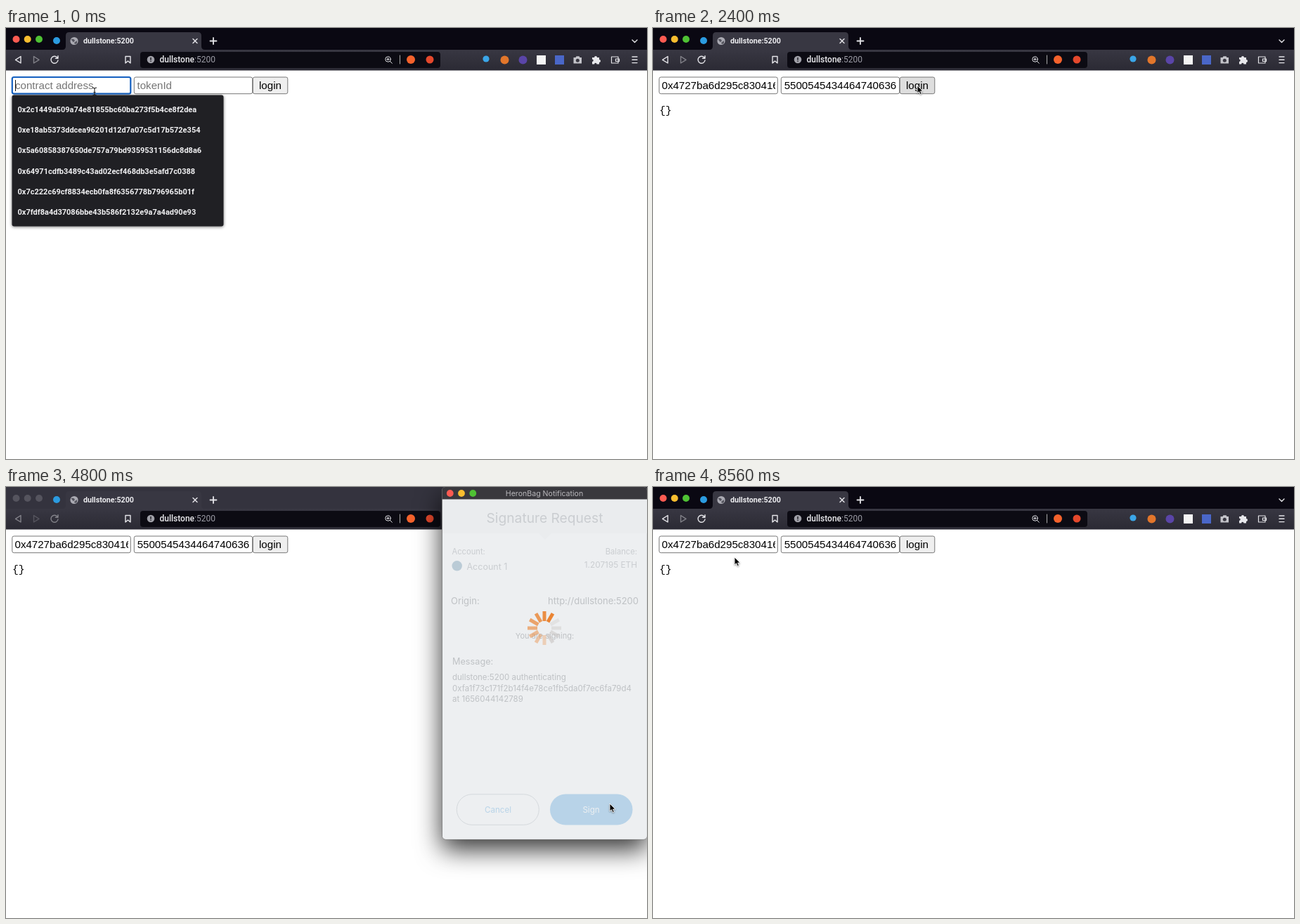
Recreate the animation shown at these times as an HTML page. Size 912 by 614 pixels, loop 8640 ms.

```html
<!DOCTYPE html>
<html lang="en">
<head>
<meta charset="utf-8">
<title>Token login</title>
<style>
html, body { margin: 0; width: 100%; height: 100%; overflow: hidden; background: #fff; }
svg { display: block; position: absolute; left: 0; top: 0; }
pre { position: absolute; left: 8.8px; top: 141.6px; margin: 0; font: 14.7px/16.6px "Liberation Mono", monospace; color: #000; }
#overlay { pointer-events: none; }
.ui { font-family: Roboto, sans-serif; }
.form { font: 15.1px "Liberation Sans", sans-serif; }
.wallet { font-family: Inter, sans-serif; fill: #24292e; }
.line { fill: none; stroke: #e4e4e8; stroke-width: 1.4; stroke-linecap: round; stroke-linejoin: round; }
.box { fill: #fff; stroke: #767676; }
.focus { stroke: #1460c0; stroke-width: 2.2; }
.btn { fill: #efefef; stroke: #767676; }
.hint { fill: #757575; }
</style>
</head>
<body>
<svg width="912" height="614" viewBox="0 0 912 614">
  <defs>
    <linearGradient id="bar" x2="0" y2="1"><stop stop-color="#383742"/><stop offset="1" stop-color="#2b2a34"/></linearGradient>
  </defs>

  <!-- browser frame -->
  <rect id="strip" width="912" height="32"/>
  <path d="M80 31Q85 31 85 26V11Q85 6 90 6H273Q278 6 278 11V26Q278 31 283 31Z" fill="#383742"/>
  <rect y="31" width="912" height="29.5" fill="url(#bar)"/>
  <rect x="191" y="34" width="427" height="23" rx="4" fill="#0c0b13"/>
  <g id="lights"><circle cx="14.5" cy="16" r="5"/><circle cx="30.7" cy="16" r="5"/><circle cx="47" cy="16" r="5"/></g>
  <circle cx="72" cy="18" r="5" fill="#2b9be0"/>
  <circle cx="97" cy="18.5" r="5.6" fill="#aaaab2"/>
  <path d="M92.5 16q4-1 5 1t-2 3zM97 21l4-3v4l-3 1z" fill="#54545e"/>
  <g class="ui" fill="#ededf0">
    <text x="110" y="22" font-size="10.7" font-weight="700">dullstone:5200</text>
    <text x="218.5" y="49.3" font-size="12"><tspan font-weight="500">dullstone</tspan><tspan fill="#9c9ca5">:5200</tspan></text>
  </g>
  <g class="line">
    <path d="M266 15.5l6 6m0-6l-6 6"/>
    <path d="M290.5 18.5h9m-4.5-4.5v9" stroke-width="1.8"/>
    <path d="M891 17l3.5 3.5L898 17"/>
    <g id="nav">
      <path d="M21 40.5v9.5l-7.5-4.7z"/>
      <path d="M39.5 40.5v9.5l7.5-4.7z" opacity=".45"/>
      <path d="M73.2 42.5a5 5 0 1 0 .8 3.5M74 39.8v3.5h-3.5"/>
    </g>
    <path d="M170 40.5h7v9.5l-3.5-3-3.5 3z"/>
    <circle cx="543.5" cy="44.5" r="3.7" stroke-width="1"/>
    <path d="M546.3 47.3l3 3M541.8 44.5h3.4m-1.7-1.7v3.4" stroke-width="1"/>
    <path d="M560.5 39v12" stroke="#aaa" stroke-width="1"/>
    <path d="M891 41h7m-7 4.3h7m-7 4.3h7"/>
    <path d="M861.5 41h9.5v9h-9.5zM867.5 44h5v3.5h-5z" stroke-width="1.2"/>
  </g>
  <circle cx="206" cy="45" r="5.3" fill="#a0a0a8"/>
  <path d="M205.3 42h1.4v3.7h-1.4zM205.3 46.7h1.4v1.4h-1.4z" fill="#15141c"/>
  <circle cx="576" cy="45" r="6" fill="#f4622c"/>
  <circle cx="603" cy="45" r="5.5" fill="#e4482c"/>
  <circle cx="683" cy="44" r="4.6" fill="#3ba6e8"/>
  <circle cx="709.5" cy="45.5" r="6" fill="#e2762b"/>
  <circle cx="735.5" cy="45.5" r="6" fill="#5a45a8"/>
  <rect x="755" y="39" width="13" height="13" fill="#f4f4f4"/>
  <rect x="781" y="39" width="13" height="13" fill="#4a67c8"/>
  <g fill="#c4c4ca">
    <path d="M807.5 42h3l1-1.8h4l1 1.8h2.5v8.5h-11.5z"/>
    <circle cx="813.3" cy="46.2" r="2.5" fill="#393842"/>
    <path fill="#e8e8ec" d="M834 42h3a2 2 0 1 1 4 0h3v3a2 2 0 1 1 0 4v2.5h-3.5a1.7 1.7 0 0 0-3.4 0H834v-3.5a1.7 1.7 0 0 0 0-3.4z"/>
  </g>

  <!-- login form -->
  <g id="login" class="form">
    <rect id="contractBox" class="box" x="8.8" y="70" width="168.5" height="23.7" rx="2.5"/>
    <rect id="tokenBox" class="box" x="182.3" y="70" width="168.3" height="23.7" rx="2.5"/>
    <rect id="loginBtn" class="btn" x="351.3" y="70" width="49.5" height="23.7" rx="2.5"/>
    <text x="360" y="87">login</text>
    <text id="contractHint" class="hint" x="13" y="87">contract address</text>
    <svg x="12.5" y="70" width="161.5" height="24"><text id="contractText" y="17">0x4727ba6d295c830416</text></svg>
    <text id="tokenHint" class="hint" x="186.5" y="87">tokenId</text>
    <text id="tokenText" x="186.7" y="87">5500545434464740636</text>
    <path id="caret" d="M0 74v16" stroke="#111"/>
    <text x="9" y="122.3" font-family="'Liberation Mono',monospace" font-size="14.7">{}</text>
    <g id="dropdown" class="ui" font-size="11" font-weight="600" fill="#f0f0f2">
      <rect x="8.5" y="95.5" width="301" height="187" rx="3" fill="#202024" style="filter:drop-shadow(0 1px 2px #0008)"/>
    </g>
  </g>

  <!-- signed-in page -->
  <g id="account" class="form">
    <circle cx="36.7" cy="97.8" r="28.3" fill="#048604"/>
    <path d="M25 91.5h12M30 85v3h3v7h-3v3M57 91.5h-12M52 85v3h-3v7h3v3M34 110.5h17" fill="none" stroke="#19ee19" stroke-width="2.6"/>
    <rect id="logoutBtn" class="btn" x="76.5" y="86.3" width="59" height="23.5" rx="2.5"/>
    <text x="85" y="103.3">logout</text>
  </g>
</svg>

<pre id="json"></pre>

<svg id="overlay" width="912" height="614" viewBox="0 0 912 614">
  <!-- wallet window -->
  <g id="popup" class="wallet">
    <rect x="620.5" width="291.5" height="502" rx="5" fill="#fff" stroke="#777" stroke-width=".8" style="filter:drop-shadow(0 14px 18px rgba(0,0,0,.8))"/>
    <g id="splash">
      <circle cx="767.5" cy="212" r="60" fill="#ee8024"/>
      <path id="ring" d="M767 293.5a9.3 9.3 0 1 1-9.3 9.3" fill="none" stroke="#e5792c" stroke-width="2.7"/>
    </g>
    <g id="request">
      <path d="M621 17H912V66H776l-9 9-9-9H621z" fill="#f2f3f4"/>
      <text x="766.5" y="50.5" font-size="19.2" text-anchor="middle" fill="#5b6067">Signature Request</text>
      <g fill="#5b6067">
        <text x="634.5" y="96" font-size="11.2">Account:</text>
        <text x="655.5" y="118" font-size="12.5">Account 1</text>
        <text x="898" y="96" font-size="11.2" text-anchor="end">Balance:</text>
        <text x="898" y="115" font-size="11.8" text-anchor="end">1.207195 ETH</text>
      </g>
      <circle cx="641.7" cy="112.3" r="7.2" fill="#10547f"/>
      <text x="633" y="166.5" font-size="13">Origin:</text>
      <text x="900" y="166.5" font-size="13" text-anchor="end">http://dullstone:5200</text>
      <text x="766.5" y="216" font-size="11" text-anchor="middle">You are signing:</text>
      <text x="635" y="253" font-size="12.7">Message:</text>
      <g font-size="11.5">
        <text x="635" y="274.5">dullstone:5200 authenticating</text>
        <text id="signer" x="635" y="290.5"></text>
        <text x="635" y="306">at 1656044142789</text>
      </g>
      <rect x="641.3" y="437.8" width="117" height="43.5" rx="21.7" fill="none" stroke="#8b959d"/>
      <rect x="774" y="437.5" width="117.5" height="44" rx="22" fill="#037dd6"/>
      <text x="700" y="463.5" font-size="11.6" text-anchor="middle" fill="#037dd6">Cancel</text>
      <text x="832.5" y="463.5" font-size="11.6" text-anchor="middle" fill="#fff">Sign</text>
    </g>
    <g id="busy">
      <path d="M621 17H912V497a5 5 0 0 1-5 5H626a5 5 0 0 1-5-5z" fill="#e9ebed" opacity=".79"/>
      <g id="spokes" stroke-width="5"></g>
    </g>
    <path d="M620.5 17.5V5q0-5 5-5H907q5 0 5 5V17.5z" fill="#39383d"/>
    <circle cx="631.8" cy="9" r="4.9" fill="#fc5b52"/>
    <circle cx="648" cy="9" r="4.9" fill="#f8bd2f"/>
    <circle cx="664.3" cy="9" r="4.9" fill="#4fc234"/>
    <text x="766" y="13" font-size="10.6" text-anchor="middle" fill="#b9b8bc">HeronBag Notification</text>
  </g>
  <path id="arrow" d="M0 0V11l2.5-2.3L4.300 12.6l2-.9L4.6 8H8z" stroke="#fff" stroke-width=".9" style="filter:drop-shadow(0 1px 1px #0006)"/>
  <path id="ibeam" d="M-3-5q3 0 3 2v7M3-5q-3 0-3 2M-3 6q3 0 3-2M3 6q-3 0-3-2M-1.5 1.5h3" fill="none" stroke="#222" stroke-width="1.1"/>
</svg>

<script>
const LOOP = 8640, STEP = 80;
const $ = id => document.getElementById(id);
const show = (id, on) => $(id).style.display = on ? '' : 'none';
const between = (t, a, b) => t >= a && t < b;

const wallet = '0xfa1f73c171f2b14f4e78ce1fb5da0f7ec6fa79d4';
const addresses = [
  '2c1449a509a74e81855bc60ba273f5b4ce8f2dea',
  'e18ab5373ddcea96201d12d7a07c5d17b572e354',
  '5a60858387650de757a79bd9359531156dc8d8a6',
  '64971cdfb3489c43ad02ecf468db3e5afd7c0388',
  '7c222c69cf8834ecb0fa8f6356778b796965b01f',
  '7fdf8a4d37086bbe43b586f2132e9a7a4ad90e93'
];
const user = {
  account: wallet,
  auth: {
    tokenURI: 'dorv://qamtrelod2pk77sw4hxnb3ey6gufcz5lmrtoavjk2ihqe4wpxs5ydnub7cg',
    image: 'https://dorv.zz/dorv/qamtrelow7xk4ujn2hvds6pbgyct5zeafoirmq3lwhu7xkdnyj2tbvsp6gc'
  }
};
$('json').textContent = JSON.stringify({ user }, null, 2);
$('signer').textContent = wallet;
$('dropdown').innerHTML += addresses.map((a, i) =>
  `<text x="16.5" y="${120 + i * 29.2}">0x${a}</text>`).join('');

// brightest spoke first, fading counterclockwise
$('spokes').innerHTML = Array.from({ length: 12 }, (_, i) =>
  `<path d="M0-10V-24" transform="rotate(${30 - i * 30})" stroke="${i < 8 ? '#ea8433' : '#c9c5c3'}" opacity="${i < 8 ? 1 - i * .1 : .6 - (i - 8) * .1}"/>`).join('');

// pointer stops: time, x, y
const stops = [
  [0, 126, 90], [560, 126, 90], [960, 244, 86], [1520, 244, 86], [1840, 376, 82],
  [2560, 376, 82], [2960, 514, 51], [3840, 850, 446], [4160, 859, 451], [5520, 859, 451],
  [6080, 114, 115], [6320, 113, 101], [7120, 113, 101], [7280, 116, 100], [LOOP, 116, 100]
];

function pointer(t) {
  const i = stops.findIndex(s => s[0] > t);
  const [t0, x0, y0] = stops[i - 1], [t1, x1, y1] = stops[i];
  const p = (t - t0) / (t1 - t0), e = p * p * (3 - 2 * p);
  return [x0 + (x1 - x0) * e, y0 + (y1 - y0) * e];
}

function draw(t) {
  const popup = between(t, 2480, 5200), signedIn = between(t, 5600, 6640);
  const pasted = t >= 480, tokenPasted = t >= 1440;
  const onContract = t < 1040, onToken = between(t, 1040, 2080);

  $('strip').style.fill = popup ? '#34333e' : '#0a0812';
  [...$('lights').children].forEach((c, i) =>
    c.style.fill = popup ? '#55545e' : ['#fc5b52', '#f8bd2f', '#4fc234'][i]);
  $('nav').style.opacity = popup ? .45 : 1;

  show('login', !signedIn);
  show('account', signedIn);
  show('json', signedIn);
  show('dropdown', !pasted);
  show('contractHint', !pasted);
  show('contractText', pasted);
  show('tokenHint', !tokenPasted);
  show('tokenText', tokenPasted);
  $('contractBox').classList.toggle('focus', onContract);
  $('tokenBox').classList.toggle('focus', onToken);
  show('caret', onContract && !pasted || onToken && !tokenPasted);
  $('caret').setAttribute('transform', `translate(${onContract ? 13.5 : 187})`);
  $('loginBtn').style.fill = between(t, 1840, 2640) ? '#dedede' : '#efefef';
  $('logoutBtn').style.fill = between(t, 6240, 6640) ? '#dedede' : '#efefef';

  show('popup', popup);
  show('splash', t < 3280);
  show('request', t >= 3280);
  show('busy', t >= 4720);
  $('ring').setAttribute('transform', `rotate(${(t - 2960) * .36 - 15} 767 302.8)`);
  $('spokes').setAttribute('transform', `translate(766 201) rotate(${(t - 4800) / STEP * 30})`);

  const [x, y] = pointer(t), typing = t < 2000 && x < 351;
  show('ibeam', typing);
  show('arrow', !typing);
  $(typing ? 'ibeam' : 'arrow').setAttribute('transform', `translate(${x} ${y})`);
}

function tick() {
  draw(Math.floor(performance.now() % LOOP / STEP) * STEP);
  requestAnimationFrame(tick);
}
tick();
</script>
</body>
</html>
```
